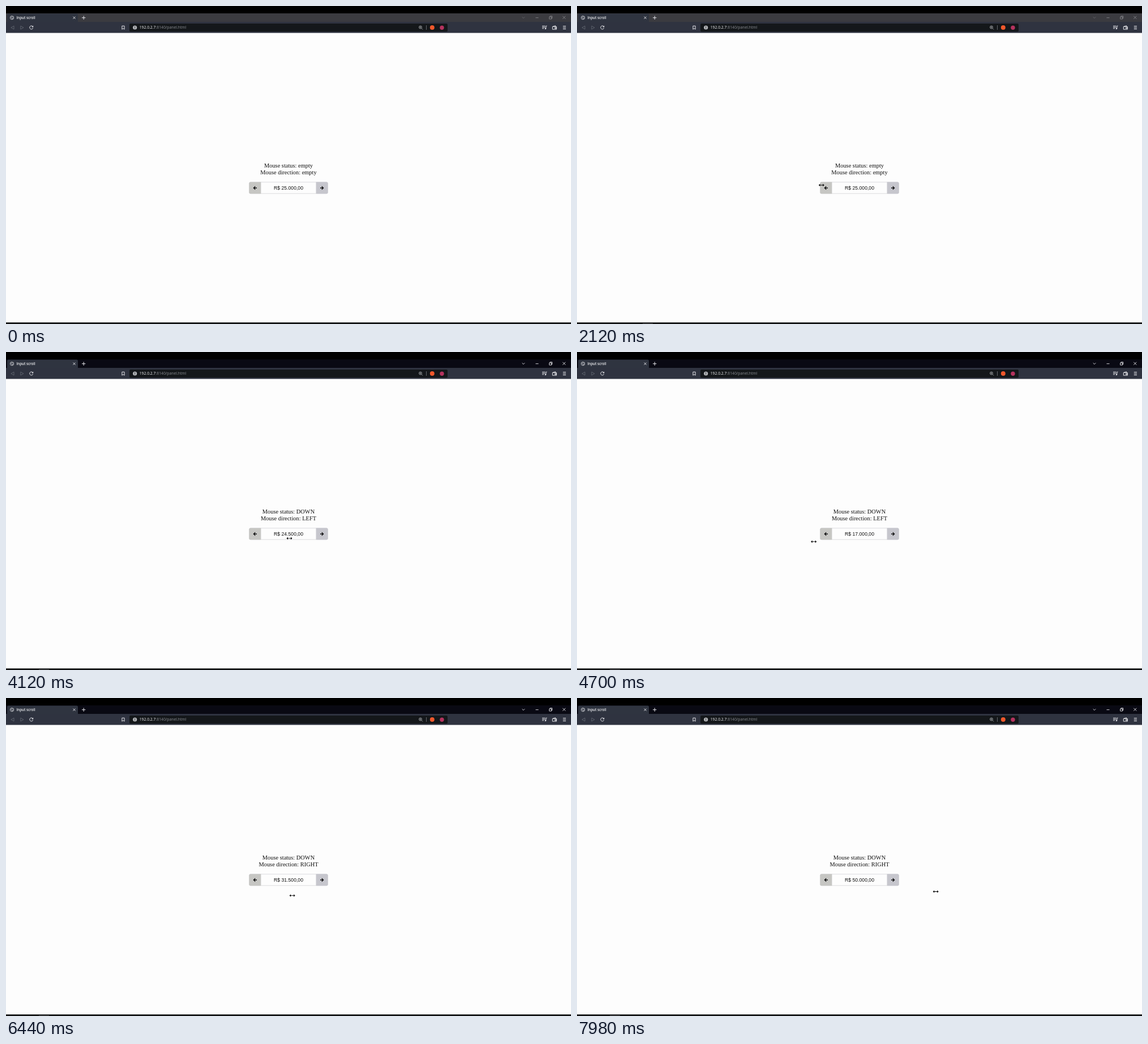
These frames come from a looping animation (998x561 px, 8000 ms). An HTML page:

```html
<!DOCTYPE html>
<html lang="en">
<head>
<meta charset="utf-8">
<title>Input scroll</title>
<style>
  html, body { margin: 0; width: 100%; height: 100%; overflow: hidden; background: #000; }
  svg { display: block; width: 998px; height: 561px; }
  .ui { font-family: "Open Sans", "Noto Sans", sans-serif; }
  .label { font: 10.4px "Liberation Serif", "Times New Roman", serif; text-anchor: middle; fill: #111; }
  .value { font: 8.67px "Liberation Sans", Arial, sans-serif; text-anchor: middle; fill: #111; }
  .line { fill: none; stroke: #e6e6ea; stroke-width: 1; }
  .strip { fill: #090913; }
  .idle .strip { fill: #3b3b40; }
  .win { fill: none; stroke: #e8e8ec; stroke-width: .9; }
  .idle .win { stroke: #85858a; }
  .idle .menu { stroke: #66666b; }
</style>
</head>
<body>
<svg id="stage" class="idle" viewBox="0 0 998 561" xmlns="http://www.w3.org/2000/svg">
  <rect width="998" height="561"/>

  <!-- tab strip -->
  <rect class="strip" y="13" width="998" height="16"/>
  <path d="M2 28.5V16q0-2.5 2.5-2.5h120q2.5 0 2.5 2.5v12.5z" fill="#2f3440"/>
  <g fill="none" stroke="#c9cbd0" stroke-width=".8">
    <circle cx="10.5" cy="20.7" r="3.2"/>
    <path d="M7.5 19.7l2.5 1 .5 2.8M9 17.9l2 1.3 2.3-.4M11.5 23.3l.5-2 1.5-.3"/>
  </g>
  <text class="ui" x="18.5" y="22.9" font-size="6.15" font-weight="600" fill="#f0f0f2">Input scroll</text>
  <path class="line" d="M118.500 18.700l4 4m0-4l-4 4"/>
  <path class="line" d="M134 20.700h6.400m-3.200-3.200v6.400"/>
  <path class="win menu" d="M911.700 19.300l2.300 2.300 2.300-2.300"/>
  <path class="win" d="M935.500 20.700h5"/>
  <path class="win" d="M959.700 19.200h3.800v3.800h-3.800zM960.900 19v-1.200h3.800v3.900h-1.200"/>
  <path class="win" d="M983.300 17.800l5 5m0-5l-5 5"/>

  <!-- toolbar -->
  <rect y="28" width="998" height="20" fill="#2f3340"/>
  <path d="M14 35.2v5.8l-5.2-2.9zM25.800 35.200v5.800l5.200-2.900z" fill="none" stroke="#686c76" stroke-width=".8"/>
  <path class="line" d="M47.300 36.300a3 3 0 1 0 .3 2.700"/>
  <path d="M48.200 34.600v3h-3z" fill="#e6e6ea"/>
  <path class="line" d="M204.900 35.200h4.200v6l-2.100-1.700-2.100 1.700z"/>
  <rect x="218" y="31" width="562" height="14.300" rx="2" fill="#14171a"/>
  <circle cx="227.700" cy="38" r="3.600" fill="#b5b7ba"/>
  <path d="M227.700 35.900v2.500m0 .7v1" stroke="#14171a" stroke-width=".9"/>
  <text class="ui" x="235.700" y="40.400" font-size="6.800" fill="#8b8e93"><tspan fill="#f4f4f6">192.0.2.7</tspan>:8140/panel.html</text>
  <g fill="none" stroke="#b8babd" stroke-width=".8">
    <circle cx="732" cy="37.500" r="2.500"/>
    <path d="M734 39.500l2 2M730.700 37.500h2.600m-1.300-1.300v2.600"/>
    <path d="M742.500 34v8" stroke="#777a80"/>
  </g>
  <circle cx="752.800" cy="38" r="4" fill="#f0582c"/>
  <circle cx="770" cy="38.200" r="3.700" fill="#b5335f"/>
  <path class="line" d="M947 35.300h5.500M947 37.500h5.500M947 39.700h3.200M953.800 39.700v-4.500h1.700"/>
  <circle cx="952.900" cy="39.900" r="1.200" fill="#e6e6ea"/>
  <path class="line" d="M965.300 36.300h7v4.900h-7zM966 36.200l4.500-1.400v1.400M969.500 38h2.800v1.700h-2.800z"/>
  <path class="line" d="M983.800 35.600h5.200M983.800 38.100h5.200M983.800 40.600h5.200"/>

  <!-- page -->
  <rect y="47.500" width="998" height="511" fill="#fdfdfd"/>
  <rect y="558.500" width="998" height="2.500" fill="#111213"/>
  <rect id="task" y="558.500" width="18" height="2.500" fill="#303133"/>
  <text id="status" class="label" x="499" y="284.500"></text>
  <text id="direction" class="label" x="499" y="296.500"></text>
  <rect x="429.400" y="310.500" width="139.200" height="20.700" rx="2.600" fill="#cfcfd4"/>
  <path d="M450.300 310.500H432q-2.600 0-2.600 2.600v15.500q0 2.600 2.600 2.600h18.300z" fill="#c6c6c3"/>
  <path d="M547.700 310.500H566q2.600 0 2.600 2.600v15.500q0 2.600-2.600 2.600h-18.300z" fill="#c6c6cd"/>
  <rect x="450.500" y="311.200" width="97" height="19.300" fill="#fdfdfd"/>
  <g fill="none" stroke="#0c0c0c" stroke-width="1.300">
    <path d="M443 321h-5.300M440.300 318.100l-2.900 2.900 2.900 2.900"/>
    <path d="M555 321h5.300M557.700 318.100l2.900 2.900-2.900 2.900"/>
  </g>
  <text id="value" class="value" x="499" y="323.900"></text>

  <g id="cursor">
    <path id="arrow" d="M0 0v9l2.100-2 1.500 3.300 1.400-.6-1.500-3.200h2.900z" fill="#fff" stroke="#111" stroke-width=".6"/>
    <path id="resize" d="M-5 0l2.500-2.300v1.900h5v-1.900L5 0 2.500 2.300V.4h-5v1.900z" fill="#000"/>
  </g>
</svg>
<script>
const LOOP = 8000;
const SHOW = 100, PRESS = 3840, DRAG = 4040, LEFT_END = 4900, TURN = 5220;
const HIGH = 25, LOW = 13.75, MAX = 50;      // thousands
const TURN_X = 405, PX_PER_THOUSAND = 5.72;

// Each glide: start, end, x, y reached; the pointer rests in between.
const glides = [
  [100, 500, 961, 335],
  [740, 1420, 616, 354],
  [1920, 2120, 432, 316],
  [2120, 2280, 404, 319],
  [2420, 2940, 513.5, 324.3],
  [3460, 3680, 512, 328],
  [DRAG, 4700, 418.3, 334.6],
  [4700, LEFT_END, TURN_X, 338],
  [TURN, 5760, 449.3, 346.2],
  [5760, 7140, 563.5, 351],
  [7140, 7960, 633.7, 341.5]
];

const $ = id => document.getElementById(id);
const stage = $("stage"), cursor = $("cursor");
const progress = (t, from, to) => Math.min(1, Math.max(0, (t - from) / (to - from)));

function pointer(t) {
  let x = 980, y = 561;
  for (const [from, to, toX, toY] of glides) {
    const k = progress(t, from, to);
    x += (toX - x) * k;
    y += (toY - y) * k;
  }
  return [x, y];
}

// Leftward drags speed up; rightward ones follow the pointer.
function amount(t, x) {
  if (t < TURN) return HIGH - (HIGH - LOW) * progress(t, DRAG, LEFT_END) ** 1.29;
  return Math.min(MAX, LOW + (x - TURN_X) / PX_PER_THOUSAND);
}

function money(thousands) {
  const halves = Math.round(thousands * 2);
  return `R$ ${Math.floor(halves / 2)}.${halves % 2 ? "500" : "000"},00`;
}

function setText(id, text) {
  const el = $(id);
  if (el.textContent !== text) el.textContent = text;
}

function show(el, on) {
  el.style.display = on ? "" : "none";
}

function draw(t) {
  const down = t >= PRESS;
  const [x, y] = pointer(t);
  const overInput = x > 429 && x < 569 && y > 310 && y < 331.5;
  const resizing = down || overInput;

  stage.classList.toggle("idle", !down);
  show($("task"), t >= SHOW);
  $("task").setAttribute("x", down ? 58 : 116);

  setText("status", "Mouse status: " + (down ? "DOWN" : "empty"));
  setText("direction", "Mouse direction: " + (t < DRAG ? "empty" : t < TURN ? "LEFT" : "RIGHT"));
  setText("value", money(amount(t, x)));

  show(cursor, t >= SHOW);
  show($("arrow"), !resizing);
  show($("resize"), resizing);
  cursor.setAttribute("transform", `translate(${x} ${y})`);
}

const start = performance.now();
function tick() {
  draw((performance.now() - start) % LOOP);
  requestAnimationFrame(tick);
}
tick();
</script>
</body>
</html>
```
